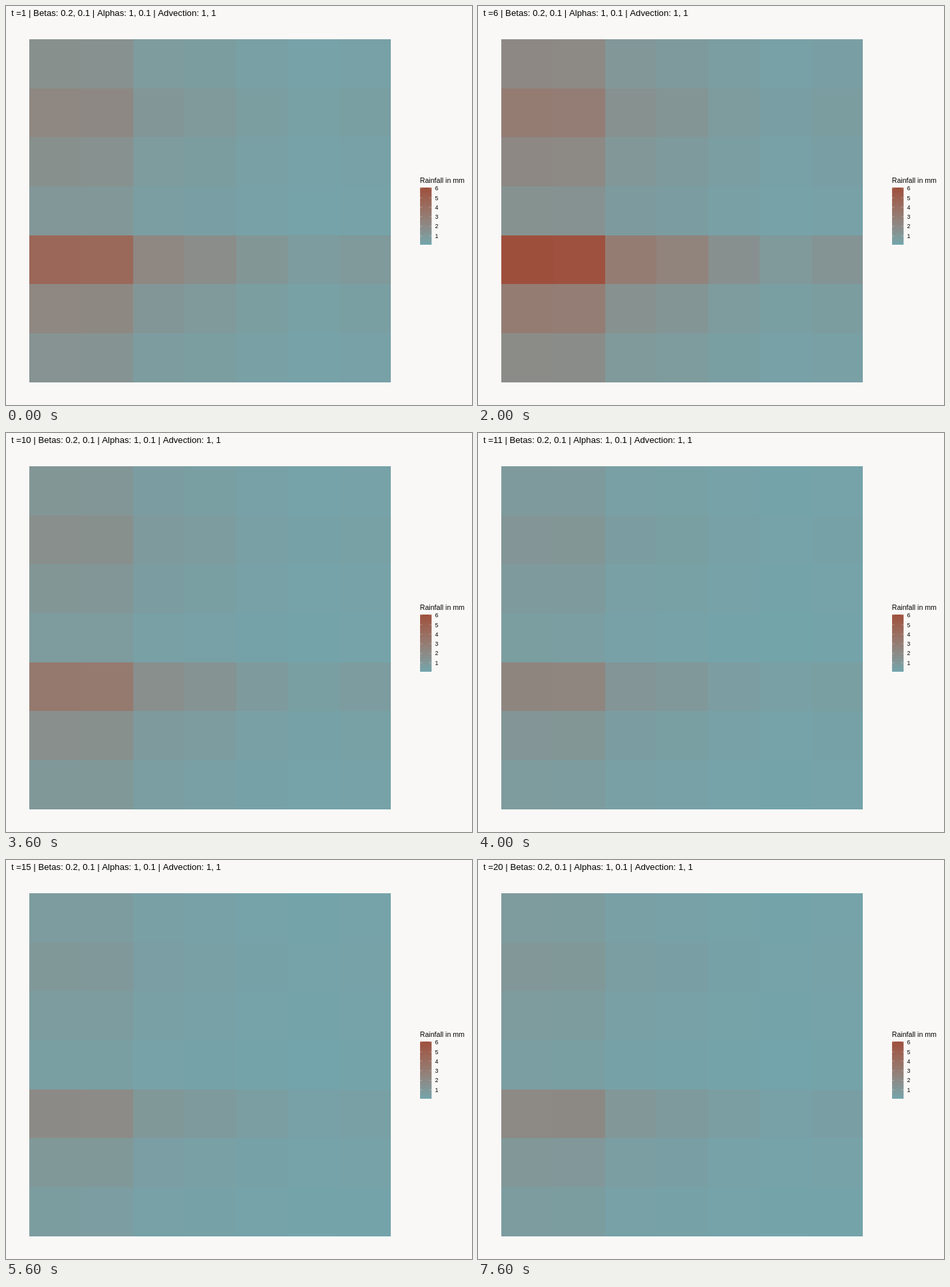
An HTML page with a canvas for the animation above (8 s loop, 700 px wide and 600 px high).

```html
<!DOCTYPE html>
<html lang="en">
<head>
<meta charset="utf-8">
<title>Rainfall grid</title>
<style>
  html, body { margin: 0; width: 100%; height: 100%; overflow: hidden; background: #f9f8f7; }
  canvas { display: block; }
</style>
</head>
<body>
<canvas id="stage" width="700" height="600"></canvas>
<script>
const ctx = document.getElementById('stage').getContext('2d');
const STEP = 400;
const MIN = 0.05, MAX = 6.05;

// Rainfall = intensity(t) * row * column
const intensity = [4.4, 2.7, 2.4, 2.2, 2.05, 6, 2.75, 2.4, 2.15, 3.2,
                   2.3, 2.05, 3.05, 2.15, 1.95, 1.8, 3.4, 2.4, 2.2, 2.05];
const rows = [0.345, 0.49, 0.345, 0.235, 1, 0.495, 0.305];
const cols = [1, 0.975, 0.495, 0.4, 0.25, 0.145, 0.205];
const edgeX = i => Math.ceil(35 + i * 543 / 7);
const edgeY = j => Math.round(50 + j * 73.65);

const toLinear = c => (c /= 255) > 0.04045 ? ((c + 0.055) / 1.055) ** 2.4 : c / 12.92;
const toByte = c => Math.round(255 * (c > 0.0031308 ? 1.055 * c ** (1 / 2.4) - 0.055 : 12.92 * c));
const toLab = rgb => {
  const [r, g, b] = rgb.map(toLinear);
  const f = v => v > 0.008856 ? Math.cbrt(v) : 7.787 * v + 16 / 116;
  const x = f((0.4124 * r + 0.3576 * g + 0.1805 * b) / 0.9505);
  const y = f(0.2126 * r + 0.7152 * g + 0.0722 * b);
  const z = f((0.0193 * r + 0.1192 * g + 0.9505 * b) / 1.089);
  return [116 * y - 16, 500 * (x - y), 200 * (y - z)];
};
const toCss = ([l, a, b]) => {
  const fy = (l + 16) / 116;
  const x = 0.9505 * (fy + a / 500) ** 3, y = fy ** 3, z = 1.089 * (fy - b / 200) ** 3;
  const rgb = [3.2406 * x - 1.5372 * y - 0.4986 * z,
               -0.9689 * x + 1.8758 * y + 0.0415 * z,
               0.0557 * x - 0.204 * y + 1.057 * z];
  return `rgb(${rgb.map(toByte).join(',')})`;
};

const low = toLab([114, 165, 172]), high = toLab([158, 79, 60]);
const color = value => {
  const p = Math.min(1, Math.max(0, (value - MIN) / (MAX - MIN)));
  return toCss(low.map((v, k) => v + (high[k] - v) * p));
};

function text(str, x, y, size) {
  ctx.font = `${size}px "Liberation Sans", Arial, sans-serif`;
  ctx.fillStyle = '#000';
  ctx.fillText(str, x, y);
}

function drawLegend() {
  const x = 622, w = 17.3, top = 273, bottom = 359;
  text('Rainfall in mm', 621.8, 266, 10.6);
  const bar = ctx.createLinearGradient(0, top, 0, bottom);
  for (let i = 0; i <= 20; i++) bar.addColorStop(i / 20, color(MAX - (MAX - MIN) * i / 20));
  ctx.fillStyle = bar;
  ctx.fillRect(x, top, w, bottom - top);
  for (let v = 1; v <= 6; v++) {
    const y = 359.8 - 14.3 * v;
    ctx.fillStyle = 'rgba(255,255,255,0.5)';
    ctx.fillRect(x, y - 0.25, 3.5, 0.5);
    ctx.fillRect(x + w - 3.5, y - 0.25, 3.5, 0.5);
    text(v, 644.6, y + 3.2, 8.8);
  }
}

function draw(step) {
  ctx.fillStyle = '#f9f8f7';
  ctx.fillRect(0, 0, 700, 600);
  text(`t =${step + 1} | Betas: 0.2, 0.1 | Alphas: 1, 0.1 | Advection: 1, 1`, 8, 15.3, 13.2);
  rows.forEach((r, j) => cols.forEach((c, i) => {
    ctx.fillStyle = color(MIN + intensity[step] * r * c);
    ctx.fillRect(edgeX(i), edgeY(j), edgeX(i + 1) - edgeX(i), edgeY(j + 1) - edgeY(j));
  }));
  drawLegend();
}

const start = performance.now();
let shown = -1;
function tick() {
  const step = Math.floor((performance.now() - start) / STEP) % intensity.length;
  if (step !== shown) draw(shown = step);
  requestAnimationFrame(tick);
}
tick();
</script>
</body>
</html>
```
